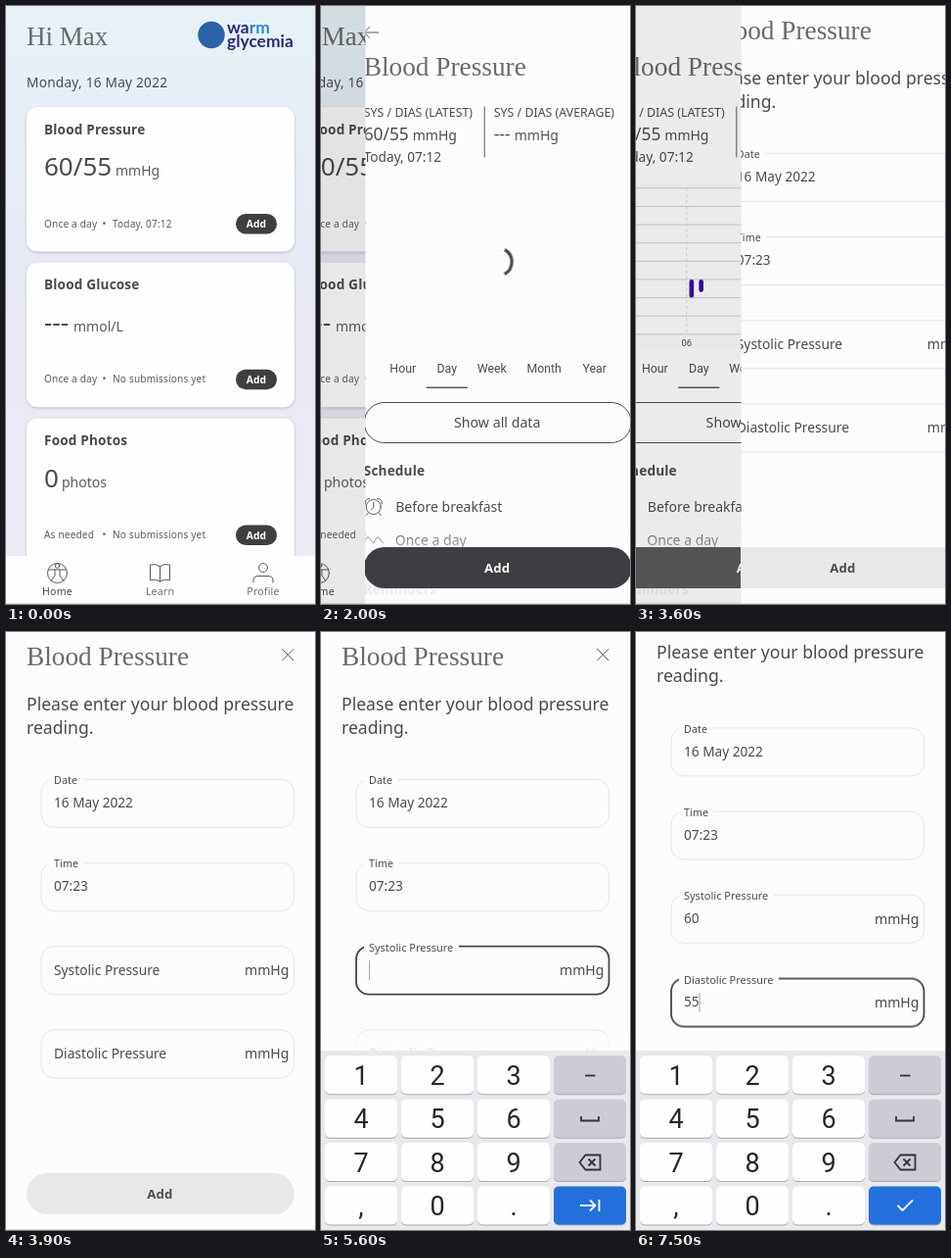
Animation of 316x610 px, one loop 8 s. Source, as an HTML page:

```html
<!DOCTYPE html>
<html lang="en">
<head>
<meta charset="utf-8">
<title>Health tracker</title>
<style>
@property --a { syntax: "<number>"; inherits: true; initial-value: 0; }
@property --b { syntax: "<number>"; inherits: true; initial-value: 0; }

html, body { margin: 0; width: 100%; height: 100%; overflow: hidden; }
#stage { position: relative; width: 316px; height: 610px; overflow: hidden;
  animation: openDetail 8s infinite, openForm 8s infinite; }
.page, .page > div, .page > svg, .dim { position: absolute; inset: 0; }
.page { overflow: hidden; }
svg { display: block; width: 316px; height: 610px; font-family: "Noto Sans", "Open Sans", sans-serif; }
.dim { background: #000; }

/* --a opens the detail page, --b opens the form */
@keyframes openDetail {
  0%, 22.93% { --a: 0; animation-timing-function: cubic-bezier(.35,.45,0,1); }
  28.24%, 100% { --a: 1; }
}
@keyframes openForm {
  0%, 43.75% { --b: 0; animation-timing-function: cubic-bezier(.35,.45,0,1); }
  48.75%, 100% { --b: 1; }
}
#home { background: linear-gradient(#e6f2f8, #e7e9f5 45%, #efebf7);
  transform: translateX(calc(-20% * var(--a))); }
#detail { transform: translateX(calc(100% * (1 - var(--a)) - 20% * var(--b))); }
#detail > div { transform: translateX(calc(-50% * (1 - var(--a)))); }
#form { transform: translateX(calc(100% * (1 - var(--b)))); }
#form > div { transform: translateX(calc(-50% * (1 - var(--b)))); }
#detail, #form { background: #fdfcfd; }
#home .dim { opacity: calc(.1 * var(--a)); }
#detail .dim { opacity: calc(.1 * var(--b)); }

text { fill: #4b4b4e; }
.b { font-weight: 600; letter-spacing: .012em; }
.s { letter-spacing: .016em; }
.m { text-anchor: middle; }
.w { fill: #fff; }
.h { font-family: "Liberation Serif", serif; fill: #6a6a6c; }
.r { font-family: Roboto, sans-serif; }
.k { font-family: Roboto, sans-serif; font-size: 27px; fill: #26272b; }
.u { fill: #5c5c5f; }
.logo { font-family: Lato, sans-serif; font-weight: 700; fill: #2c2a70; }
.line { fill: none; stroke: #58585b; stroke-width: 1; stroke-linecap: round; stroke-linejoin: round; }
.card { fill: #fefefe; filter: drop-shadow(0 1.5px 1.5px #0003); }
.key { filter: drop-shadow(0 1px .5px #0004); }

.tap { transform-box: fill-box; transform-origin: center; animation: 8s infinite; }
#tapCard { animation-name: tapCard; }
#tapAdd { animation-name: tapAdd; }
@keyframes tapCard {
  0%, 21.2% { opacity: 0; transform: none; }
  21.21%, 21.25% { opacity: 1; transform: none; }
  22.6% { opacity: 1; transform: scale(1.7); }
  26.5%, 100% { opacity: 0; transform: scale(1.9); }
}
@keyframes tapAdd {
  0%, 42.45% { opacity: 0; transform: none; }
  42.46%, 42.5% { opacity: 1; transform: none; }
  43.8% { opacity: 1; transform: scale(1.7); }
  47%, 100% { opacity: 0; transform: scale(1.9); }
}
#spin { transform-origin: 158px 261px; animation: spin 8s linear infinite; }
@keyframes spin {
  0%, 22.5% { transform: rotate(-72deg); }
  28.75%, 100% { transform: rotate(108deg); }
}

.step { animation: 8s step-end -.01s infinite; }
#loading { animation-name: loading; }
#loaded { animation-name: loaded; }
@keyframes loading { 0% { opacity: 1; } 28.75% { opacity: 0; } }
@keyframes loaded { 0% { opacity: 0; } 28.75% { opacity: 1; } }

#focusSys { animation-name: focusSys; }
#focusDia, #done { animation-name: focusDia; }
#next { animation-name: next; }
#gapSys { animation-name: gapSys; }
@keyframes focusSys { 0% { opacity: 0; } 57.5% { opacity: 1; } 81.25% { opacity: 0; } }
@keyframes focusDia { 0% { opacity: 0; } 81.25% { opacity: 1; } }
@keyframes next { 0% { opacity: 1; } 81.25% { opacity: 0; } }
@keyframes gapSys { 0% { opacity: 0; } 57.5% { opacity: 1; } }

#labelSys { animation: labelSys 8s infinite; }
#labelDia { animation: labelDia 8s infinite; }
@keyframes labelSys {
  0%, 57.5% { transform: none; }
  59.4%, 100% { transform: translateY(-24.2px) scale(.795); }
}
@keyframes labelDia {
  0%, 81.25% { transform: none; }
  83.1%, 100% { transform: translateY(-24.2px) scale(.795); }
}
#scroll { animation: scroll 8s infinite; }
@keyframes scroll {
  0%, 81.25% { transform: none; animation-timing-function: ease-out; }
  85%, 100% { transform: translateY(-52.4px); }
}
#board { animation: board 8s infinite; }
@keyframes board {
  0%, 58.5% { transform: translateY(215px); animation-timing-function: cubic-bezier(.2,.6,.2,1); }
  63.6%, 100% { transform: none; }
}

#caretSys { animation-name: caretSys; }
#caretDia { animation-name: caretDia; }
@keyframes caretSys {
  0% { opacity: 0; transform: none; }
  57.5% { opacity: 1; }
  63.75% { opacity: 0; }
  70% { opacity: 1; }
  73.75% { transform: translateX(7.8px); }
  75% { transform: translateX(15.5px); }
  81.25% { opacity: 0; }
}
@keyframes caretDia {
  0% { opacity: 0; transform: none; }
  81.25% { opacity: 1; }
  88.75% { opacity: 0; }
  92.5% { opacity: 1; transform: translateX(7.8px); }
  93.75% { transform: translateX(15.5px); }
}
#sys1 { animation-name: sys1; }
#sys2 { animation-name: sys2; }
#dia1 { animation-name: dia1; }
#dia2 { animation-name: dia2; }
@keyframes sys1 { 0% { opacity: 0; } 73.75% { opacity: 1; } }
@keyframes sys2 { 0% { opacity: 0; } 75% { opacity: 1; } }
@keyframes dia1 { 0% { opacity: 0; } 92.5% { opacity: 1; } }
@keyframes dia2 { 0% { opacity: 0; } 93.75% { opacity: 1; } }
#press6 { animation-name: press6; }
#press0 { animation-name: press0; }
#press5 { animation-name: press5; }
@keyframes press6 { 0% { opacity: 0; } 72.5% { opacity: 1; } 73.75% { opacity: 0; } }
@keyframes press0 { 0% { opacity: 0; } 73.75% { opacity: 1; } 75% { opacity: 0; } }
@keyframes press5 { 0% { opacity: 0; } 91.25% { opacity: 1; } 93.75% { opacity: 0; } }
</style>
</head>
<body>
<div id="stage">
  <div class="page" id="home"><svg></svg><div class="dim"></div></div>
  <div class="page" id="detail"><div><svg></svg></div><div class="dim"></div></div>
  <div class="page" id="form"><div><svg></svg></div></div>
</div>
<script>
const text = (x, y, size, str, cls = '', more = '') =>
  `<text x="${x}" y="${y}" font-size="${size}" class="${cls}" ${more}>${str}</text>`;
const box = (x, y, w, h, rx, fill, more = '') =>
  `<rect x="${x}" y="${y}" width="${w}" height="${h}" rx="${rx}" fill="${fill}" ${more}/>`;
const line = (d, more = '') => `<path class="line" d="${d}" ${more}/>`;
const fade = (id, from, to) =>
  `<linearGradient id="${id}" gradientUnits="userSpaceOnUse" x1="0" x2="0" y1="${from}" y2="${to}">
    <stop stop-color="#fdfcfd" stop-opacity="0"/><stop offset="1" stop-color="#fdfcfd" stop-opacity=".9"/>
  </linearGradient>`;
const draw = (page, ...parts) =>
  document.querySelector(`#${page} svg`).innerHTML = parts.join('');
const baseRule = box(0, 609, 316, 1, 0, '#dcdcde');

// Home
const card = (i, title, value, unitX, unit, often, when, under = '') =>
  `<g transform="translate(0 ${i * 158.8})">
    ${box(21, 103, 274, 147.5, 11, '#fefefe', 'class="card"')}${under}
    ${text(39, 130.7, 13.6, title, 'b')}
    ${text(39, 173, 26, value)}${text(unitX, 173, 14, unit, 'u')}
    ${text(39, 225.7, 10.1, often, 's u')}${text(98.5, 225.7, 10.1, '•', 'u')}${text(109, 225.7, 10.1, when, 's u')}
    ${box(235, 212, 42, 20.5, 10.2, '#3f3f42')}${text(256, 226, 10.3, 'Add', 'b m w')}
  </g>`;
const none = 'No submissions yet';
draw('home',
  `<clipPath id="cardClip">${box(21, 103, 274, 147.5, 11, '#000')}</clipPath>`,
  text(21, 40, 27, 'Hi Max', 'h'),
  '<circle cx="210" cy="29.5" r="13.7" fill="#2a62a8"/>',
  text(226, 28, 17.4, 'wa<tspan fill="#2f86c9">rm</tspan>', 'logo'),
  text(226, 42, 17.4, 'glycemia', 'logo'),
  text(21, 83, 13.7, 'Monday, 16 May 2022', 's'),
  card(0, 'Blood Pressure', '60/55', 112, 'mmHg', 'Once a day', 'Today, 07:12',
    '<g clip-path="url(#cardClip)"><circle class="tap" id="tapCard" cx="114" cy="184" r="111" fill="#cfcfcf"/></g>'),
  card(1, 'Blood Glucose', '---', 69, 'mmol/L', 'Once a day', none),
  card(2, 'Food Photos', '0', 57, 'photos', 'As needed', none),
  box(0, 561, 316, 49, 0, '#fefefe'), baseRule,
  '<circle class="line" cx="52.5" cy="578.5" r="10"/><circle class="line" cx="52.5" cy="571" r="2.3"/>',
  line('M43.5 575H61.5M50 575V581L46 586.5M55 575V581L59 586.5'),
  line('M157.5 571.5Q153 568.5 147.5 570V585.5Q153 584 157.5 587Q162 584 167.5 585.5V570Q162 568.5 157.5 571.5V587'),
  '<circle class="line" cx="263" cy="573" r="4.5"/>',
  line('M253 588V586Q253 581.5 258 581.5H268Q273 581.5 273 586V588'),
  text(52.5, 601, 10.6, 'Home', 's m', 'font-weight="500"'),
  text(157.5, 601, 10.6, 'Learn', 's m', 'opacity=".8"'),
  text(263, 601, 10.6, 'Profile', 's m', 'opacity=".8"'));

// Detail
const ticks = [...Array(9).keys()].map(i => {
  const y = 185.8 + i * 18.63;
  return `<path d="M34 ${y}H271" stroke="#cfced3"/>` + text(275.5, y + 3.3, 9.4, 110 - i * 10, 'r');
});
const hours = ['00', '06', '12', '18', '00'].map((h, i) => {
  const x = 34.3 + i * 59.2, dash = i % 4 ? 'stroke-dasharray="3 3"' : '';
  return `<path d="M${x} 185.8V334.8" stroke="#d3d2d8" ${dash}/>` + text(x, 347, 9.4, h, 'r m');
});
const tabs = [['Hour', 61], ['Day', 106], ['Week', 152], ['Month', 205.5], ['Year', 257]]
  .map(([name, x]) => text(x, 374, 12.3, name, 'r m'));
const average = (value, x) => text(154, 137, 17.3, value) + text(x, 137, 14, 'mmHg');
draw('detail',
  fade('listFade', 525, 575),
  `<clipPath id="addClip">${box(21, 552, 274, 42, 21, '#000')}</clipPath>`,
  line('M36 27H21.5M27 21.5L21.5 27L27 32.5'),
  text(21, 71, 27.3, 'Blood Pressure', 'h'),
  text(21, 112.7, 12.4, 'SYS / DIAS (LATEST)'),
  text(21, 137, 17.3, '60/55'), text(71, 137, 14, 'mmHg'),
  text(21, 158.5, 13.65, 'Today, 07:12'),
  line('M144.5 103V154'),
  text(154, 112.7, 12.4, 'SYS / DIAS (AVERAGE)'),
  `<g class="step" id="loading">${average('---', 175)}
    <path id="spin" d="M165 248.5A14.3 14.3 0 0 1 165 273.5" fill="none" stroke="#4a4a4d" stroke-width="3.2"/></g>`,
  `<g class="step" id="loaded">${average('60/52', 204)}${text(154, 158.5, 13.65, '16/05/2022')}
    ${box(21, 181, 274, 169, 0, '#f9f8fb')}${box(34, 186, 237, 149, 0, '#fcfbfd')}
    ${ticks.join('')}${hours.join('')}
    <path d="M98.5 281.3V295.2M108.3 281.3V289.6" stroke="#350e9e" stroke-width="4.6" stroke-linecap="round"/></g>`,
  ...tabs,
  line('M85.5 389.3H126.5', 'style="stroke-width:1.5"'),
  box(21.5, 404.5, 273, 41, 20.5, 'none', 'stroke="#4a4a4d"'),
  text(157.5, 430, 14.2, 'Show all data', 'm'),
  text(21, 478.7, 13.6, 'Schedule', 'b'),
  '<circle class="line" cx="31" cy="511" r="7.5"/>',
  line('M31 506.5V511.5L28.5 514M22.5 508Q22 502.5 27 502.5M39.5 508Q40 502.5 35 502.5M25.5 517L23.5 519.5M36.5 517L38.5 519.5'),
  text(53.5, 515.5, 14, 'Before breakfast'),
  line('M21 548Q24 539 27 543T31 548Q35 539 37 543T41 548'),
  text(53, 549.5, 14, 'Once a day'),
  text(21, 599.5, 13.6, 'Reminders', 'b'),
  box(0, 525, 316, 85, 0, 'url(#listFade)'),
  box(21, 552, 274, 42, 21, '#3e3e42'),
  '<g clip-path="url(#addClip)"><circle class="tap" id="tapAdd" cx="188" cy="573" r="102" fill="#929193"/></g>',
  text(157.5, 578, 13.2, 'Add', 'b m w'), baseRule);

// Form
const frame = (y, more = 'stroke="#e4e3e6"') => box(36, y, 258.5, 49, 13, 'none', more);
const gap = (y, w, more = '') => box(44, y - 2, w, 4, 0, '#fdfcfd', more);
const field = (y, label, w, value) =>
  frame(y) + gap(y, w) + text(49, y + 4.8, 10.6, label, 's') + text(49, y + 28.8, 13.65, value);
const entry = (y, id, label, w, digits) => {
  const focus = frame(y, 'stroke="#47474a" stroke-width="1.8"');
  const gapMark = id === 'Sys' ? gap(y, w, 'class="step" id="gapSys"') : '';
  const [d1, d2] = [0, 1].map(i => text(49 + i * 7.8, y + 28.8, 13.65, digits[i], 'step',
    `id="${id.toLowerCase()}${i + 1}"`));
  return frame(y) + gapMark +
    `<g class="step" id="focus${id}">${focus}${gap(y, w)}</g>
    <g transform="translate(49 ${y + 29.3})"><g id="label${id}">${text(0, 0, 13.8, label)}</g></g>
    ${text(244, y + 29.5, 14.1, 'mmHg')}${d1}${d2}
    ${box(49, y + 14.5, 1, 20, 0, '#a3a3a8', `class="step" id="caret${id}"`)}`;
};
const rows = ['123', '456', '789', ',0.'];
const keyX = c => 4 + c * 78, keyY = r => 432.3 + r * 44.4;
const key = (c, r, fill) => box(keyX(c), keyY(r), 74, 39, 5, fill, 'class="key"');
const keys = rows.flatMap((row, r) => [
  ...[...row].map((ch, c) => key(c, r, '#fefefe') + text(keyX(c) + 37, keyY(r) + 29.5, 27, ch, 'k m')),
  key(3, r, r < 3 ? '#cdccd6' : '#2370dc')]);
const press = (n, c, r) => box(keyX(c), keyY(r), 74, 39, 5, '#0002', `class="step" id="press${n}"`);
const icon = (d, color = '#33343a', more = '') =>
  `<path d="${d}" fill="none" stroke="${color}" stroke-width="1.8" ${more}/>`;
draw('form',
  fade('boardFade', 403, 427),
  `<g id="scroll">
    ${text(21, 34, 27.3, 'Blood Pressure', 'h')}
    ${line('M282.5 17.5L294 29M294 17.5L282.5 29')}
    ${text(21, 79.7, 17.6, 'Please enter your blood pressure')}
    ${text(21, 103.7, 17.6, 'reading.')}
    ${field(150.3, 'Date', 34, '16 May 2022')}
    ${field(235.5, 'Time', 35, '07:23')}
    ${entry(320.7, 'Sys', 'Systolic Pressure', 97, '60')}
    ${entry(405.9, 'Dia', 'Diastolic Pressure', 102, '55')}
  </g>`,
  box(21, 552, 274, 42, 21, '#e9e7e9'), text(157.5, 578, 13.2, 'Add', 'b m'), baseRule,
  `<g id="board">
    ${box(0, 403, 316, 24, 0, 'url(#boardFade)')}
    ${box(0, 427, 316, 183, 0, '#e8e9ed')}
    ${keys.join('')}
    ${press(6, 2, 1)}${press(0, 1, 3)}${press(5, 1, 1)}
    ${icon('M270 452.5H280.5')}
    ${icon('M266 494V498.5H284V494')}
    ${icon('M270.5 533.5H285.5V548.5H270.5L264.5 541ZM273.5 537.5L280.5 544.5M280.5 537.5L273.5 544.5')}
    ${icon('M265 585H280M275 579.5L280.5 585L275 590.5M284.5 579V591', '#fff', 'class="step" id="next"')}
    ${icon('M267.5 585L272.5 590L283 579.5', '#fff', 'class="step" id="done"')}
  </g>`);
</script>
</body>
</html>
```
